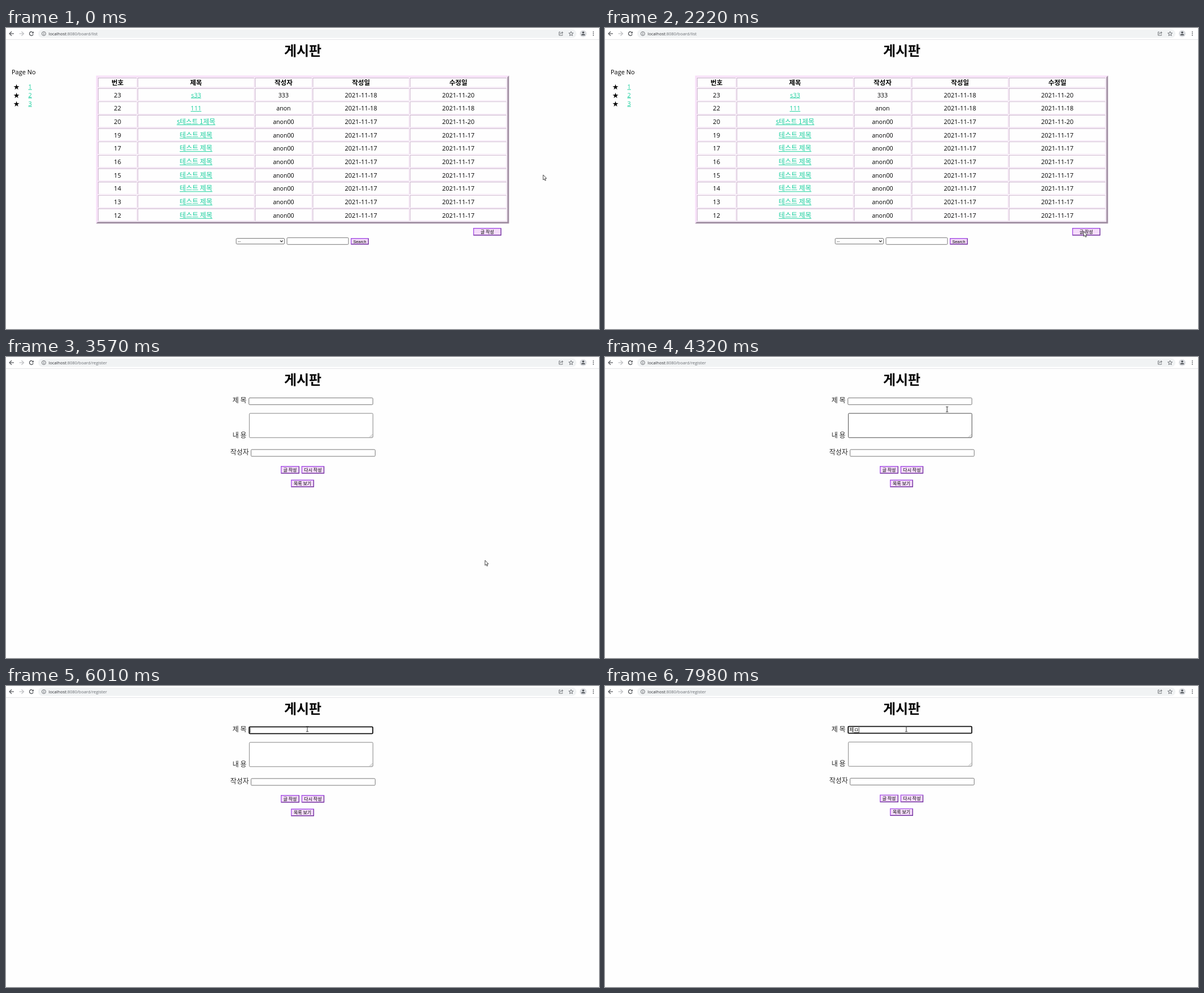
An HTML page with a canvas for the animation above (8 s loop, 1051x533 px).

```html
<!DOCTYPE html>
<html lang="ko">
<head>
<meta charset="utf-8">
<title>게시판</title>
<style>
html, body { margin: 0; width: 100%; height: 100%; overflow: hidden; background: #fefefe; }
canvas { display: block; }
</style>
</head>
<body>
<canvas id="stage" width="1051" height="533"></canvas>
<script>
const ctx = document.getElementById('stage').getContext('2d');
const LOOP = 8000, STEP = 68;
const LATIN = '"Open Sans", "Noto Sans CJK KR", sans-serif';
const HANGUL = '"Noto Sans CJK KR", "Noto Sans CJK", sans-serif';
const ARIAL = '"Liberation Sans", sans-serif';
const GREEN = '#1fd0a0', GREY = '#5f6368', FIELD = '#767676', HOVER = '#4a4a4a';
const PAGE_CHANGE = 3570, FOCUS = 5020, TYPING = 6920;

function text(str, x, y, size, { font = LATIN, color = '#000', align = 'center', weight = 400 } = {}) {
  ctx.font = `${weight} ${size}px ${font}`;
  ctx.textAlign = align;
  ctx.fillStyle = color;
  ctx.fillText(str, x, y);
  return ctx.measureText(str).width;
}

function link(str, x, y, size, font) {
  const w = text(str, x, y, size, { font, color: GREEN });
  ctx.fillRect(x - w / 2, y + 1, w, 1);
}

function fill(color, x, y, w, h) {
  ctx.fillStyle = color;
  ctx.fillRect(x, y, w, h);
}

function poly(points, color, outline) {
  ctx.beginPath();
  points.forEach(([x, y]) => ctx.lineTo(x, y));
  ctx.closePath();
  ctx.fillStyle = color;
  ctx.fill();
  if (outline) stroke(outline, 0.9);
}

function stroke(color, width = 1) {
  ctx.strokeStyle = color;
  ctx.lineWidth = width;
  ctx.stroke();
}

function line(points, color, width) {
  ctx.beginPath();
  points.forEach(([x, y]) => ctx.lineTo(x, y));
  stroke(color, width);
}

function circle(x, y, r, color) {
  ctx.beginPath();
  ctx.arc(x, y, r, 0, Math.PI * 2);
  ctx.fillStyle = color;
  ctx.fill();
}

// Two-tone border with mitred corners.
function bevel(x, y, w, h, b, light, dark) {
  const r = x + w, d = y + h;
  poly([[x, d], [x, y], [r, y], [r - b, y + b], [x + b, y + b], [x + b, d - b]], light);
  poly([[x, d], [r, d], [r, y], [r - b, y + b], [r - b, d - b], [x + b, d - b]], dark);
}

function button(label, x, y, w, h, pressed, font = HANGUL, size = 8) {
  const tones = ['#a855e6', '#7433a0'];
  if (pressed) tones.reverse();
  fill('#f5dcfa', x, y, w, h);
  bevel(x, y, w, h, 1.4, ...tones);
  text(label, x + w / 2, y + h / 2 + 2.9, size, { font });
}

function field(x, y, w, h, color = FIELD, width = 1) {
  ctx.beginPath();
  ctx.roundRect(x, y, w, h, 1.5);
  ctx.fillStyle = '#fff';
  ctx.fill();
  stroke(color, width);
}

function arrowIcon(x, dir, color) {
  line([[x - 4 * dir, 10], [x + 4 * dir, 10]], color, 1.2);
  line([[x, 6.2], [x + 4 * dir, 10], [x, 13.8]], color, 1.2);
}

function toolbar(path, loading) {
  fill('#fff', 0, 0, 1051, 20);
  fill('#e4e5e7', 0, 20, 1051, 1);
  ctx.beginPath();
  ctx.roundRect(57, 2.5, 954, 15, 7.5);
  ctx.fillStyle = '#f1f3f4';
  ctx.fill();

  arrowIcon(10, -1, '#505357');
  arrowIcon(27.5, 1, '#bcbec1');
  if (loading) {
    line([[41.7, 6.7], [48.3, 13.3]], GREY, 1.3);
    line([[48.3, 6.7], [41.7, 13.3]], GREY, 1.3);
  } else {
    ctx.beginPath();
    ctx.arc(45, 10, 3.4, 0.3, 5.5);
    stroke('#505357', 1.3);
    poly([[49, 6], [49, 9.6], [45.4, 9.6]], '#505357');
  }

  ctx.beginPath();
  ctx.arc(67, 10, 3.5, 0, Math.PI * 2);
  stroke(GREY, 0.9);
  fill(GREY, 66.5, 9.4, 1, 2.7);
  fill(GREY, 66.5, 7.7, 1, 1);
  const w = text('localhost', 75.5, 12.6, 7.5, { color: '#303236', align: 'left' });
  text(':8080/board/' + path, 75.5 + w, 12.6, 7.5, { color: '#6b6f74', align: 'left' });

  line([[982.5, 7], [980.3, 7], [980.3, 13], [986.3, 13], [986.3, 11.5]], GREY, 0.9);
  line([[982.2, 11], [983, 8.8], [987, 8.3]], GREY, 0.9);
  line([[985, 6.2], [987.2, 8.3], [985, 10.3]], GREY, 0.9);
  ctx.beginPath();
  for (let i = 0; i < 10; i++) {
    const a = i * Math.PI / 5 - Math.PI / 2, r = i % 2 ? 1.8 : 4.2;
    ctx.lineTo(1001.5 + r * Math.cos(a), 10.3 + r * Math.sin(a));
  }
  ctx.closePath();
  stroke(GREY, 0.9);
  circle(1023, 10, 6, '#dadce0');
  circle(1023, 8, 1.8, '#4c5055');
  ctx.beginPath();
  ctx.ellipse(1023, 13, 3.4, 2.2, 0, Math.PI, 0);
  ctx.fillStyle = '#4c5055';
  ctx.fill();
  for (const y of [7, 10, 13]) circle(1041, y, 0.9, GREY);
}

const COLUMNS = [163, 233.3, 441.3, 543.5, 715.8, 888.5];
const HEADERS = ['번호', '제목', '작성자', '작성일', '수정일'];
const ROWS = [
  [23, 's33', '333', 18, 20],
  [22, '111', 'anon', 18, 18],
  [20, 's테스트 1제목', 'anon00', 17, 20],
  ...[19, 17, 16, 15, 14, 13, 12].map(n => [n, '테스트 제목', 'anon00', 17, 17])
];

function tableRow(y, h, drawCell) {
  for (let c = 0; c < 5; c++) {
    const x = COLUMNS[c], w = COLUMNS[c + 1] - x - 1;
    bevel(x, y, w, h, 0.9, '#c3a6c5', '#f0d9f1');
    drawCell(c, x + w / 2);
  }
}

function listPage(t) {
  text('Page No', 10, 81.5, 11, { align: 'left' });
  for (let i = 0; i < 3; i++) {
    text('★', 18.5, 108 + 15 * i, 10.7, { font: HANGUL });
    link(String(i + 1), 42.7, 107.5 + 15 * i, 11);
  }

  bevel(159.7, 84.3, 731.8, 262, 3, '#f7dff8', '#a08da2');
  tableRow(88, 17.3, (c, x) => text(HEADERS[c], x, 101, 11.6, { font: HANGUL, weight: 700 }));
  ROWS.forEach((row, i) => {
    const top = 106.5 + 23.68 * i, base = 122.5 + 23.68 * i;
    tableRow(top, 22.6, (c, x) => {
      const value = row[c];
      if (c === 1) {
        const korean = value.length > 3;
        link(value, x, base, korean ? (value[0] === 's' ? 11.7 : 12) : 11, korean ? HANGUL : LATIN);
      } else {
        text(c > 2 ? '2021-11-' + value : String(value), x, base, c === 2 ? 10.6 : 11);
      }
    });
  });

  button('글 작성', 828, 354, 50, 13.5, t >= 3020 && t < 3150);
  field(408, 372.5, 85.5, 10);
  text('--', 411, 380.2, 7.3, { font: ARIAL, align: 'left' });
  line([[486, 376.3], [488.3, 378.7], [490.6, 376.3]], '#222', 1.2);
  field(498, 371.3, 109, 12);
  button('Search', 611, 372, 32, 11.5, false, ARIAL, 7.3);
}

function formPage(t, pointer) {
  const shift = t >= TYPING ? -0.6 : 0;
  const focused = t >= FOCUS;
  const label = (str, x, y) => text(str, x, y, 12, { font: HANGUL, color: '#2a2a2a' });

  label('제 목', 414, 81.3);
  label('내 용', 414, 143 + shift);
  label('작성자', 414, 172.5 + shift);

  if (focused) field(430.9, 72.3 + shift, 219.2, 12, '#101010', 1.8);
  else field(430.5, 72.4, 219.7, 12, t >= 4578 ? HOVER : FIELD);
  const overArea = pointer.y > 90 && pointer.y < 143 && pointer.x < 650;
  field(431.3, 99.8 + shift, 219, 43, overArea ? HOVER : '#858585');
  for (const d of [2, 5]) line([[649.5 - d, 142 + shift], [649.5, 142 - d + shift]], '#888', 0.7);
  field(434.3, 163.9 + shift, 220, 12);

  button('글 작성', 487, 193 + shift, 33, 13.5);
  button('다시 작성', 523.7, 193 + shift, 40.5, 13.5);
  button('목록 보기', 505, 217.3 + shift, 41, 13.2);
  if (focused) typing(t);
}

function typing(t) {
  const done = t >= 7980 ? '제' : '';
  const composing = t >= 7980 ? 'ㅁ' : t >= 7250 ? '제' : t >= TYPING ? 'ㅈ' : '';
  let x = 433;
  const opts = { font: HANGUL, align: 'left', color: '#111' };
  x += text(done, x, 81, 9, opts);
  if (composing) {
    const w = text(composing, x, 81, 9, opts);
    fill('#222', x, 82, w, 0.9);
    x += w;
  }
  const blinkOff = (t >= 5550 && t < 6010) || (t >= 6590 && t < TYPING) || (t >= 7780 && t < 7980);
  if (!blinkOff) fill('#222', x - (composing ? 0 : 0.6), 73.5, 0.9, 9.3);
}

const mix = (a, b, p) => a + (b - a) * p;

function pointerAt(t) {
  const stepped = (start, end) => {
    const at = start + Math.floor((t - start) / STEP) * STEP;
    return Math.min(1, (at - start + STEP) / (end - start + STEP));
  };
  if (t < 830) return { x: 952, y: 260 };
  if (t < 1660) {
    const p = stepped(830, 1578) ** 2;
    return { x: mix(952, 872, p), y: mix(260, 309, p) };
  }
  if (t < 3370) {
    const p = 1 - (1 - stepped(1660, 2204)) ** 2;
    return { x: mix(872, 848.5, p), y: mix(309, 360, p) };
  }
  if (t < 3830) return { x: 849, y: 360 };
  if (t < 4670) {
    const left = 1 - stepped(3830, 4578);
    return { x: mix(534, 849, left ** 1.34), y: mix(72, 360, left ** 2.4) };
  }
  return { x: 534, y: t < 4740 ? 74 : 76.2 };
}

function drawPointer({ x, y }, t) {
  const overText = t >= PAGE_CHANGE && x < 654 && y < 143;
  if (overText) {
    line([[x, y - 4.5], [x, y + 4.5]], '#333', 1);
    for (const d of [-4.5, 4.5]) line([[x - 2.2, y + d], [x + 2.2, y + d]], '#333', 0.9);
    return;
  }
  const shape = [[0, 0], [0, 9], [2, 7.2], [3.3, 10.2], [4.8, 9.6], [3.5, 6.6], [6, 6.3]];
  poly(shape.map(([dx, dy]) => [x + dx, y + dy]), '#fff', '#333');
}

function draw(now) {
  const t = now % LOOP;
  const pointer = pointerAt(t);
  const onList = t < PAGE_CHANGE;
  fill('#fefefe', 0, 0, 1051, 533);
  toolbar(onList ? 'list' : 'register', t >= 3150 && onList);
  text('게시판', 526, 49, 24, { font: HANGUL, weight: 700 });
  if (onList) listPage(t);
  else formPage(t, pointer);
  drawPointer(pointer, t);
}

const started = performance.now();
function frame() {
  draw(performance.now() - started);
  requestAnimationFrame(frame);
}
frame();
</script>
</body>
</html>
```
